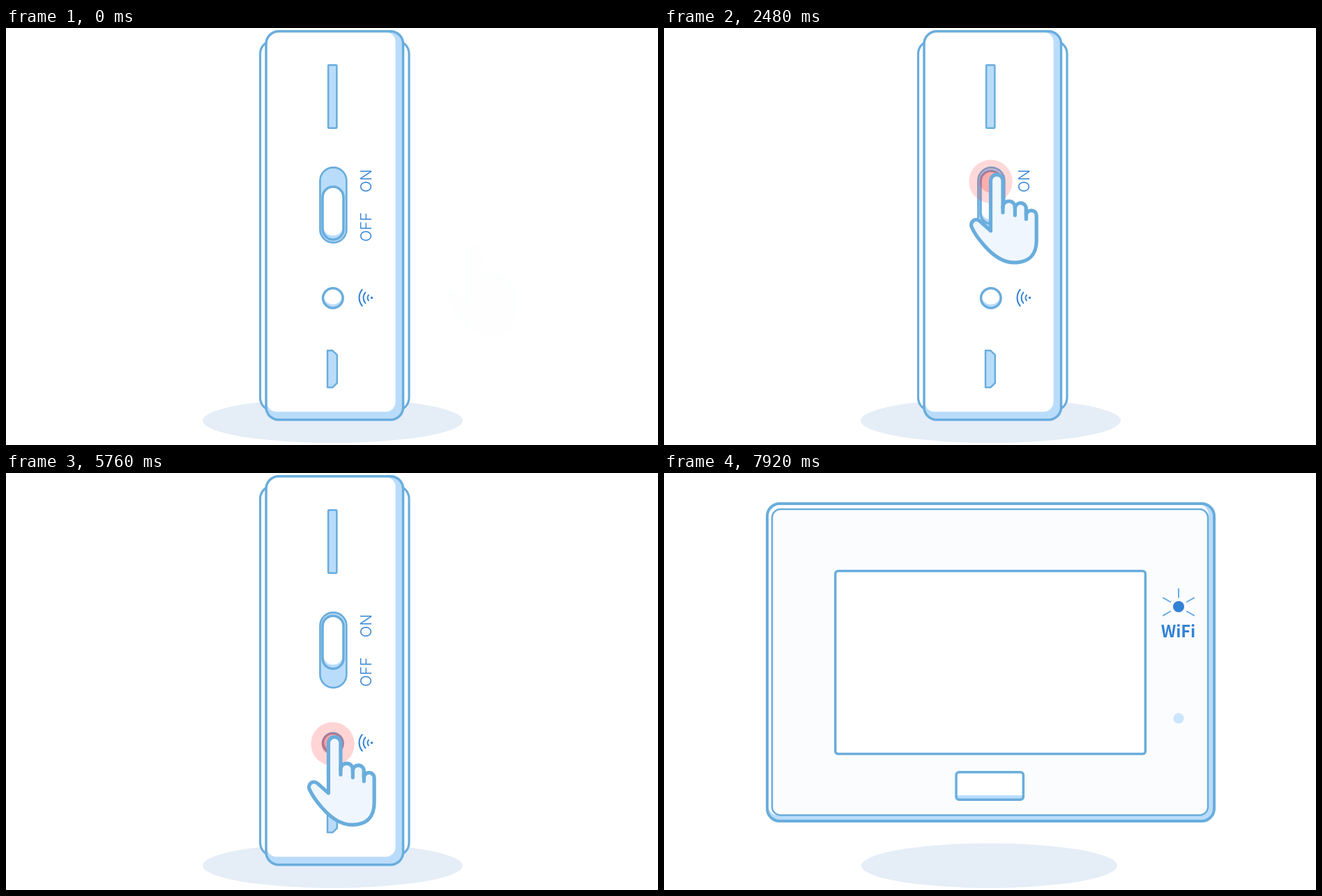
These frames come from a looping animation (935 by 599 pixels, 8000 ms). An HTML page:

```html
<!DOCTYPE html>
<html lang="en">
<head>
<meta charset="utf-8">
<title>Switch on and pair</title>
<style>
  html, body { margin: 0; width: 100%; height: 100%; overflow: hidden; background: #fff; }
  svg { display: block; width: 935px; height: 599px; }
  .line { stroke: #69addc; stroke-linejoin: round; stroke-linecap: round; }
  .shade { fill: #badcfb; }
  .white { fill: #fff; }
  .none { fill: none; }
  .ink { fill: #3182d5; }
  .label { font: 300 22px Inter, Arial, sans-serif; text-anchor: middle; }
  .wifi { font: 700 23.5px "Noto Sans CJK SC", "Noto Sans CJK JP", "Noto Sans", sans-serif; text-anchor: middle; }
</style>
</head>
<body>
<svg viewBox="0 0 935 599">
  <ellipse id="shadow" cy="564" ry="32" fill="#e5edf7"/>

  <g id="front">
    <rect class="shade" x="148" y="44" width="641" height="456" rx="18"/>
    <rect class="white" x="149" y="45" width="632" height="447" rx="15"/>
    <rect class="line none" x="148" y="44" width="641" height="456" rx="18" stroke-width="4"/>
    <rect class="line" x="155" y="52" width="625" height="439.5" rx="12" fill="#fbfcfe" stroke-width="2.5"/>
    <rect class="line white" x="245.7" y="140.8" width="444.6" height="262.8" rx="4" stroke-width="3.5"/>
    <rect class="white" x="419" y="429.8" width="96.3" height="39.5" rx="4"/>
    <rect class="shade" x="420" y="463" width="94" height="6"/>
    <rect class="line none" x="419" y="429.8" width="96.3" height="39.5" rx="4" stroke-width="3.5"/>
    <text class="ink wifi" x="737.5" y="236">WiFi</text>
    <circle cx="738" cy="192" r="7.6" fill="#cbe5fc"/>
    <circle cx="738" cy="352.3" r="7.6" fill="#cbe5fc"/>
    <g id="glow" transform="translate(738 192)">
      <circle class="ink" r="8"/>
      <path id="rays" stroke="#66abe6" stroke-width="2" stroke-linecap="round"/>
    </g>
  </g>

  <g id="side">
    <rect class="line white" x="364.5" y="18" width="213.5" height="532" rx="19" stroke-width="3.2"/>
    <rect class="shade" x="373" y="4.8" width="196.5" height="558" rx="18"/>
    <rect class="white" x="374" y="6" width="184.5" height="545.3" rx="14"/>
    <rect class="line none" x="373" y="4.8" width="196.5" height="558" rx="18" stroke-width="3.5"/>
    <rect class="line shade" x="462.1" y="53.2" width="12.2" height="90.6" rx="1" stroke-width="2.5"/>
    <rect class="line shade" x="450.4" y="200.4" width="37.9" height="108" rx="18.9" stroke-width="2.6"/>
    <g id="knob">
      <rect class="shade" x="454" y="228" width="30" height="76" rx="15"/>
      <rect class="white" x="455.3" y="229" width="27.4" height="69" rx="13"/>
      <rect class="line none" x="454" y="228" width="30" height="76" rx="15" stroke-width="3.5"/>
    </g>
    <circle class="shade" cx="468.8" cy="388" r="14.3"/>
    <ellipse class="white" cx="468.8" cy="385" rx="13" ry="12"/>
    <circle class="line none" cx="468.8" cy="388" r="14.3" stroke-width="3.5"/>
    <path class="line shade" d="M461 463.3H468.3L474.8 469.7V510L468.3 516.3H461Z" stroke-width="2.5"/>
    <text class="ink label" transform="translate(524 219.5) rotate(-90)">ON</text>
    <text class="ink label" transform="translate(524 285.8) rotate(-90)">OFF</text>
    <g transform="translate(524.5 387.5)">
      <circle class="ink" r="1.7"/>
      <path id="waves" class="none" stroke="#3182d5" stroke-width="2" stroke-linecap="round"/>
    </g>
  </g>

  <g id="pulse" fill="#ff3c3c">
    <circle r="31.2" fill-opacity=".23"/>
    <circle r="16" fill-opacity=".33"/>
  </g>

  <g id="hand" class="line" fill="#eff6fe" stroke-width="5.2">
    <path d="M31 83V11a8.75 8.75 0 0 1 17.5 0V49a8.7 8.7 0 0 1 17.4 0V51a8 8 0 0 1 16 0V61a7.4 7.4 0 0 1 14.8 0V97
             c0 20-11 31.5-32 31.5C48 128.5 33 117 21 103C14 95 8 87 4 78c-3.5-7 4.5-15.5 12-8.5Z"/>
    <path class="none" d="M48.5 48V56.5M65.9 49V60.5M81.9 53V66"/>
  </g>
</svg>
<script>
const LOOP = 8000;
const $ = id => document.getElementById(id);
const ramp = (t, start, length) => Math.min(1, Math.max(0, (t - start) / length));
const smooth = (t, start, length) => {
  const p = ramp(t, start, length);
  return p * p * (3 - 2 * p);
};
const mix = (a, b, p) => a + (b - a) * p;
const fade = (id, opacity) => $(id).setAttribute('opacity', opacity);
const place = (id, x, y) => $(id).setAttribute('transform', `translate(${x} ${y})`);

// a point at the given radius, the angle measured from straight up
const polar = (radius, degrees) => {
  const a = degrees * Math.PI / 180;
  return `${radius * Math.sin(a)} ${-radius * Math.cos(a)}`;
};
$('rays').setAttribute('d', [-120, -60, 0, 60, 120]
  .map(a => `M${polar(13.5, a)}L${polar(25.4, a)}`).join(''));
$('waves').setAttribute('d', [6, 12, 18]
  .map(r => `M${polar(r, -50)}A${r} ${r} 0 0 0 ${polar(r, -130)}`).join(''));

const switchTap = { show: 0, reach: 400, leave: 2400, leaveTime: 820, hide: 3300 };
const buttonTap = { show: 4190, reach: 4205, leave: 5733, leaveTime: 567, hide: 5995 };

function draw(t) {
  const slide = smooth(t, 1620, 533);
  const onSwitch = t < 3900;
  const tap = onSwitch ? switchTap : buttonTap;

  const near = smooth(t, tap.reach, 820) - smooth(t, tap.leave, tap.leaveTime);
  const rest = onSwitch ? [631.5, 311.5 - 87.5 * slide] : [627, 355];
  const tip = onSwitch ? [432, 278 - 70 * slide] : [430, 377];
  place('hand', mix(rest[0], tip[0], near), mix(rest[1], tip[1], near));
  fade('hand', ramp(t, tap.show, 220) - ramp(t, tap.hide, 210));

  place('pulse', 468.5, onSwitch ? 293.5 - 73 * slide : 389.2);
  fade('pulse', ramp(t, tap.reach + 650, 230) - ramp(t, tap.leave, 560));
  place('knob', 0, -22.8 * slide);

  const turn = ramp(t, 6530, 410);
  fade('side', 1 - ramp(t, 6290, 510));
  fade('front', turn);
  $('shadow').setAttribute('cx', mix(468.5, 466.5, turn));
  $('shadow').setAttribute('rx', mix(186.5, 183.5, turn));
  fade('glow', smooth(t, 7160, 780));
}

function tick() {
  draw(performance.now() % LOOP);
  requestAnimationFrame(tick);
}
tick();
</script>
</body>
</html>
```
